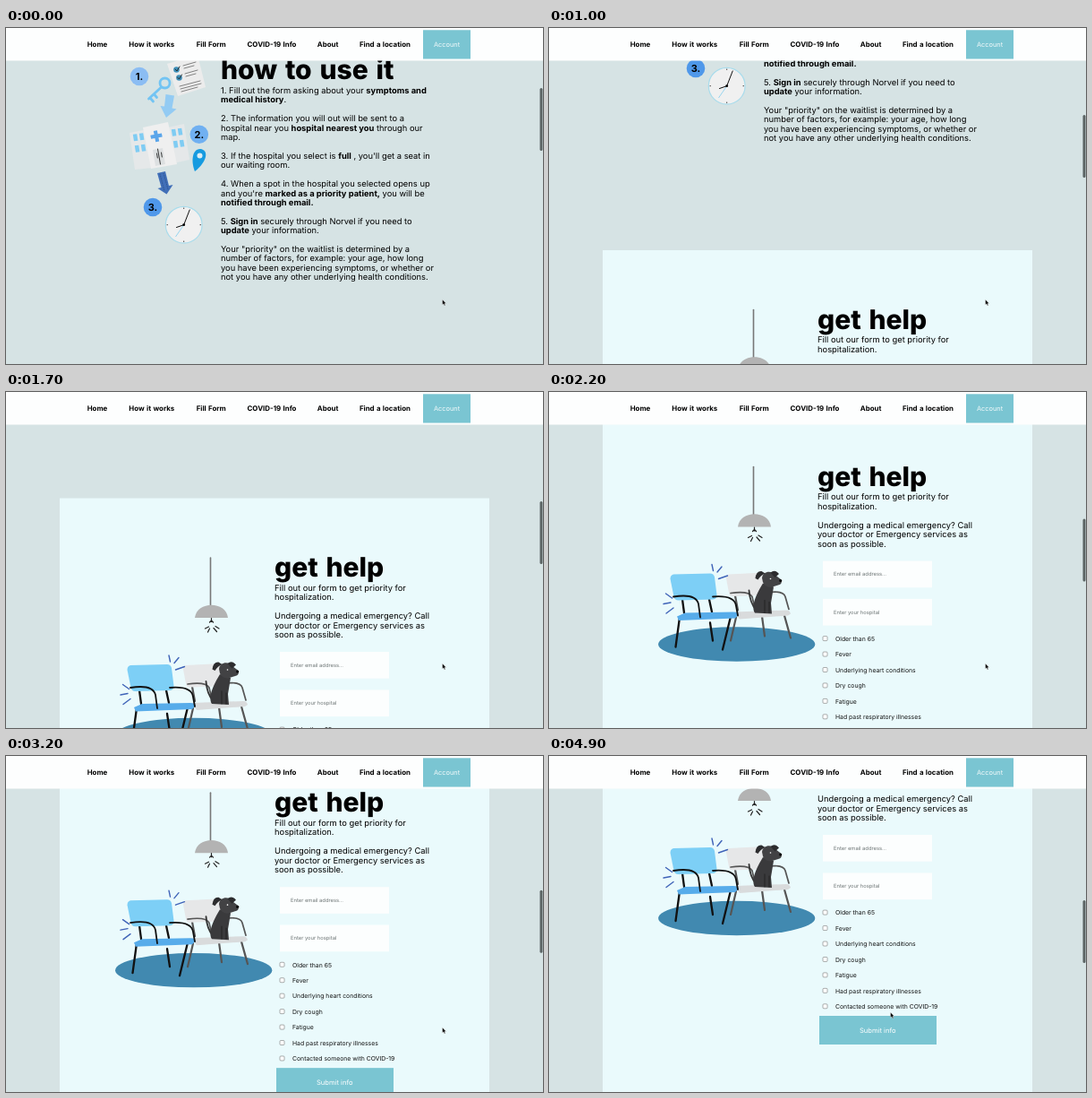
An HTML page for the animation above (5000 ms loop, 600 px wide and 375 px high).

```html
<!DOCTYPE html>
<html lang="en">
<head>
<meta charset="utf-8">
<title>Waitlist page scroll</title>
<style>
  html, body { margin: 0; width: 100%; height: 100%; overflow: hidden; background: #d6e3e4; }
  svg { display: block; width: 100%; height: 100%; font-family: Inter, "Open Sans", sans-serif; }
  text { text-rendering: geometricPrecision; }
  .heading { font-size: 30px; font-weight: 800; word-spacing: 2.2px; }
  .body { font-size: 9.35px; }
  .body .b { font-weight: 700; }
  .nav { font-size: 7.9px; font-weight: 700; text-anchor: middle; word-spacing: .5px; }
  .button { font-size: 7.6px; fill: #fff; text-anchor: middle; }
  .hint { font-size: 5.8px; fill: #6c7474; }
  .label { font-size: 6.85px; fill: #111; }
  .badge { font-size: 11px; font-weight: 700; text-anchor: middle; }
  .line { fill: none; stroke-linecap: round; stroke-linejoin: round; }
</style>
</head>
<body>
<svg viewBox="0 0 600 375">
  <rect width="600" height="375" fill="#d6e3e4"/>
  <g id="page">
    <text class="heading" x="240" y="57">how to use it</text>
    <g id="steps" class="body"></g>

    <!-- form and key -->
    <path d="M180 40L214 30L223 66L192 76Z" fill="#ececec"/>
    <g fill="#3f8fb8"><circle cx="190.500" cy="46.500" r="3.300"/><circle cx="193.500" cy="55.500" r="3.300"/></g>
    <path class="line" stroke="#222" stroke-width=".9" d="M189 46l2 2 3-5M191.500 55l2 2 3-5"/>
    <path class="line" stroke="#666" stroke-width=".8" d="M198 42l14-4M199 45l11-3M200 51l14-4M201 54l11-3M194 65l23-6M195 68l23-6M196 71l18-5"/>
    <g class="line" stroke="#72c4f3" stroke-width="2.800">
      <circle cx="177.500" cy="61.500" r="5.500"/>
      <path d="M173.500 66L159.500 79M161 78l3.500 4M165.500 74l3 3.500"/>
    </g>
    <path d="M178.500 74l9.500 1.500-2.500 14 5 1-11.500 9.500-6.500-13 4.500 .5Z" fill="#93cbf3"/>

    <!-- hospital -->
    <path d="M138 117l20-4 6 43-20 2ZM181 111l18-4 6 40-18 4Z" fill="#e5e8e9"/>
    <path d="M153 111l28-6 10 47-29 5Z" fill="#efefef"/>
    <path d="M164.800 115l4-.8.8 4 4.300-.8.8 4-4.300.8.8 4.300-4 .8-.8-4.300-4.300.8-.8-4 4.300-.8Z" fill="#5aa5ea"/>
    <path fill="none" stroke="#7fccf3" stroke-width="4.500"
      d="M144 118.500l1.200 7.500M151 117.500l1.200 7.500M146 131l1.200 7.500M153 130l1.200 7.500M187 113l1.200 7.500M194 112l1.200 7.500M189 126l1.200 7.500M196 125l1.200 7.500"/>
    <path d="M164 136l11-2 3 18-11 2Z" fill="#dde0e1"/>
    <path class="line" stroke="#222" stroke-width=".9" d="M169.500 135l3 17M173.500 139l.8 5M168.500 140l.8 5"/>
    <path d="M211 160C207 151 207 135 217 135C227 136 225 149 211 160Z" fill="#169be0"/>
    <circle cx="216.500" cy="142.500" r="3" fill="#dceef5"/>
    <path d="M169 162l9-2 4 16 4.500-1-7 10.500-10-6.500 4-1Z" fill="#416fb8"/>
    <path class="line" stroke="#24477f" stroke-width=".6" stroke-dasharray="1 1.500" d="M172 163l5 19M176 162l5 18"/>

    <!-- clock -->
    <circle cx="198.700" cy="219.700" r="20.400" fill="#f0f0f0" stroke="#a9dcec" stroke-width="1.200"/>
    <path class="line" stroke="#333" d="M198.700 201v.5M198.700 238v.5M180 219.700h.5M217 219.700h.5"/>
    <path class="line" stroke="#7fccee" stroke-width=".8" d="M198.700 219.700l-9 13"/>
    <path class="line" stroke="#111" d="M190.500 222.500l8.200-2.800 6.500-16.700"/>
    <circle cx="198.700" cy="219.700" r="1.400"/>
    <g id="badges"></g>

    <!-- form panel -->
    <rect x="60" y="403" width="480" height="600" fill="#eafafc"/>
    <text class="heading" x="300" y="490.500">get help</text>
    <g id="intro" class="body"></g>
    <g id="form"></g>
    <rect x="302" y="776.500" width="131" height="32" fill="#7ac5d2"/>
    <text class="button" x="367.300" y="795.200">Submit info</text>

    <!-- waiting room -->
    <g transform="translate(0 415.500)">
      <ellipse cx="209.700" cy="252" rx="87.600" ry="19.200" fill="#4189b0"/>
      <path class="line" stroke="#777" stroke-width="1.600" d="M228.500 54V108"/>
      <path d="M211 121C213 102 246 102 248 121Z" fill="#b3b3b3"/>
      <path class="line" stroke="#222" stroke-width="1.200" d="M229.500 121.500v4M227.500 126l2-2 2 2M222.500 133l4-2M225.500 137l2-4M232 132.500l3.500 4M234 130.500l4 2.500"/>

      <path class="line" stroke="#555" stroke-width="2.200" d="M209 222L203 248M238 221L241 243M263 220L270 245M208 198l3 16"/>
      <path d="M201 174l39-2q4 0 4.500 4l2 17q0 4-4 4.300l-37 1.200q-4 0-4.500-4l-3-16q0-4 3-4.500Z" fill="#e6e7e8"/>
      <path d="M207 216l58-2q4 0 5 4l-3 2-54 4Z" fill="#d9dbdc"/>
      <path class="line" stroke="#555" stroke-width="1.700" d="M203 195q20-3 24 4l4 17M246 194q16-2 18 5l4 14"/>

      <path class="line" stroke="#333" stroke-width="1.800" d="M223.500 192q1 14 8 22"/>
      <path d="M239 184C233 194 225 209 230 217L249 218L248 206L251 188Z" fill="#3a3a3c"/>
      <path d="M238 178C239 170 249 169 253 175L259 179.500Q261.500 185 256 186L248 188.500Q239 189 238 178Z" fill="#424244"/>
      <path d="M230.500 178.500q1-8.500 7-8l4 2.500q-5 2-8 7ZM247.500 172q5-4 9.500 1.500l-4.500 4Z" fill="#2c2c2e"/>
      <path class="line" stroke="#222" stroke-width="1" d="M241 203v14M246 205v12"/>
      <circle cx="247.500" cy="179" r=".8" fill="#fff"/><circle cx="258.700" cy="181" r="1.500"/>

      <path class="line" stroke="#111" stroke-width="2.300" d="M146 222L141.500 255M180 228L183 248M203 221L194 258M149 202l2 15M179 202l3 14"/>
      <path d="M139 174l41-1q4 0 5 4l2.500 20q0 4.500-4 5l-39 1q-4 0-5-4l-4-20q0-4 3.500-5Z" fill="#7dcff6"/>
      <path d="M143 221l9-4 54-1q5 0 6 3l-4 4-63 2.500Z" fill="#57acea"/>
      <path class="line" stroke="#111" stroke-width="1.800" d="M139 199q25-4 28 8l2 15M183 199q24-2 26 10l2 11"/>
      <path class="line" stroke="#3f63b8" stroke-width="1.400" d="M182 163l1.500 7M188 171.500l5-6M189.500 179l10-3.500M130.500 195.500l7 5M128 207l8-1.500M131 217.500l8-6"/>
    </g>
  </g>

  <g id="header">
    <rect width="600" height="36.500" fill="#fdfefe"/>
    <rect x="466" y="2.300" width="53" height="32.200" fill="#7ac5d2"/>
    <text class="button" x="492.500" y="20.800" style="font-size:7.4px" fill-opacity=".9">Account</text>
  </g>
  <rect id="scrollbar" x="596.500" y="67" width="3" height="70" rx="1.500" fill="#5b6464"/>
  <path id="cursor" d="M0 0V6L1.400 4.800L2.400 7L3.400 6.500L2.500 4.500H4.300Z" stroke="#fff" stroke-width=".4"/>
</svg>

<script>
const el = id => document.getElementById(id);
const add = (id, markup) => el(id).insertAdjacentHTML("beforeend", markup);
const text = (cls, x, y, content) => `<text class="${cls}" x="${x}" y="${y}">${content}</text>`;

// *stars* mark bold runs; empty lines leave a gap
function paragraph(id, x, baseline, copy) {
  copy.split("\n").forEach((line, i) => {
    const runs = line.replace(/\*(.+?)\*/g, '<tspan class="b">$1</tspan>');
    add(id, text("", x, baseline + i * 10.42, runs));
  });
}

paragraph("steps", 240, 72.9, `1. Fill out the form asking about your *symptoms and*
*medical history*.

2. The information you will out will be sent to a
hospital near you *hospital nearest you* through our
map.

3. If the hospital you select is *full* , you'll get a seat in
our waiting room.

4. When a spot in the hospital you selected opens up
and you're *marked as a priority patient,* you will be
*notified through email.*

5. *Sign in* securely through Norvel if you need to
*update* your information.

Your "priority" on the waitlist is determined by a
number of factors, for example: your age, how long
you have been experiencing symptoms, or whether or
not you have any other underlying health conditions.`);

paragraph("intro", 300, 506.4, `Fill out our form to get priority for
hospitalization.

Undergoing a medical emergency? Call
your doctor or Emergency services as
soon as possible.`);

[["Home", 102], ["How it works", 162.8], ["Fill Form", 229.2], ["COVID-19 Info", 297],
 ["About", 359.6], ["Find a location", 423.4]]
  .forEach(([name, x]) => add("header", text("nav", x, 20.8, name)));

[[149, 54, "#8bbdf3"], [215.8, 118.7, "#70b0f1"], [164, 200, "#4f98ea"]].forEach(([x, y, color], i) =>
  add("badges", `<circle cx="${x}" cy="${y}" r="10.3" fill="${color}"/>` + text("badge", x, y + 4, `${i + 1}.`)));

["Enter email address...", "Enter your hospital"].forEach((hint, i) => {
  const y = 574.5 + i * 42.4;
  add("form", `<rect x="306" y="${y}" width="122" height="29.7" fill="#fcfefe"/>` + text("hint", 318, y + 16.7, hint));
});

["Older than 65", "Fever", "Underlying heart conditions", "Dry cough", "Fatigue",
 "Had past respiratory illnesses", "Contacted someone with COVID-19"].forEach((name, i) => {
  const y = 661.4 + i * 17.45;
  add("form", `<rect x="306" y="${y - 2.8}" width="5" height="5" rx="1" fill="#fff" stroke="#767676" stroke-width=".6"/>`
    + text("label", 320, y + 2.5, name));
});

// Tracks are [time, value] points, joined linearly
const scrollTrack = [[0, 0], [200, 31], [300, 31], [400, 45], [600, 91], [1000, 155], [1400, 208], [1500, 208],
  [1700, 284.5], [1800, 312], [2000, 357], [2200, 386], [2400, 404], [2700, 415.5], [2800, 415.5],
  [3000, 421], [3300, 432], [3400, 433], [4500, 433], [4900, 486.5]];
const cursorX = [[3400, 487.5], [3800, 309], [4000, 309], [4400, 381.5]];
const cursorY = [[3400, 303], [3800, 246], [4000, 246], [4400, 286]];
const barOpacity = [[3400, 1], [3700, 0], [4500, 0], [4600, 1]];

function sample(track, t) {
  const next = track.findIndex(([time]) => time > t);
  if (next === 0) return track[0][1];
  if (next < 0) return track[track.length - 1][1];
  const [t0, v0] = track[next - 1], [t1, v1] = track[next];
  return v0 + (v1 - v0) * (t - t0) / (t1 - t0);
}

const start = performance.now();
function draw() {
  // The picture advances ten times a second
  const t = Math.floor((performance.now() - start) % 5000 / 100) * 100;
  const scroll = sample(scrollTrack, t);
  el("page").setAttribute("transform", `translate(0 ${-scroll})`);
  el("scrollbar").setAttribute("y", 67 + scroll * 0.193);
  el("scrollbar").setAttribute("opacity", sample(barOpacity, t));
  el("cursor").setAttribute("transform", `translate(${sample(cursorX, t)} ${sample(cursorY, t)})`);
  requestAnimationFrame(draw);
}
draw();
</script>
</body>
</html>
```
